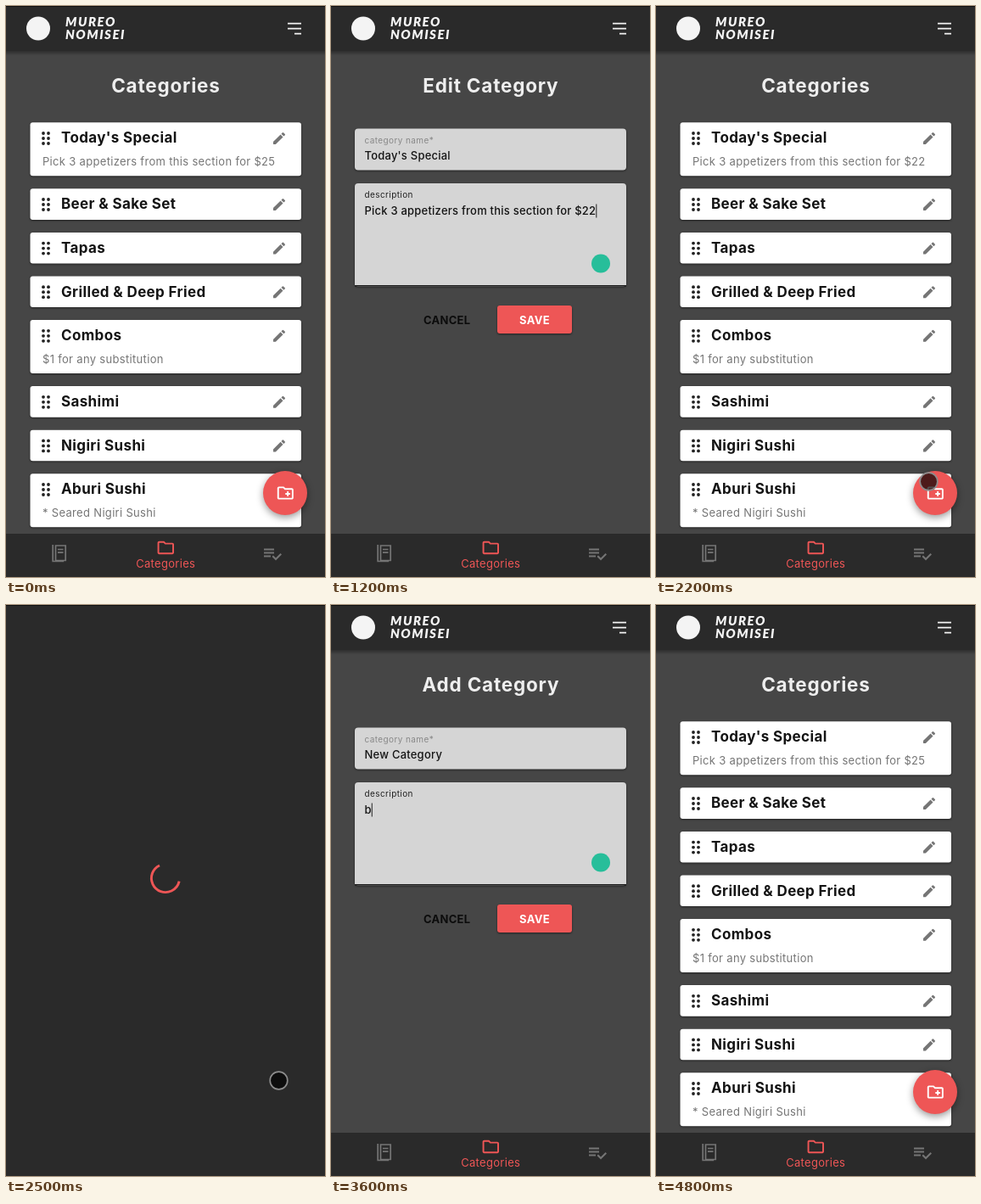
These frames come from a looping animation (376x673 px, 4900 ms). An HTML page:

```html
<!DOCTYPE html>
<html lang="en">
<head>
<meta charset="utf-8">
<title>Menu categories</title>
<style>
  html, body { margin: 0; width: 100%; height: 100%; overflow: hidden; background: #292929; }
  svg { display: block; width: 376px; height: 673px; }
  text { font-family: Inter, "Open Sans", sans-serif; white-space: pre; }
  .heading { font-size: 22.5px; font-weight: 700; letter-spacing: .8px; fill: #eee; text-anchor: middle; }
  .name { font-size: 17px; font-weight: 700; letter-spacing: .36px; fill: #141414; }
  .body { font-size: 13px; letter-spacing: .32px; }
  .input { font-weight: 500; letter-spacing: .22px; fill: #141414; }
  .small { font-size: 10px; letter-spacing: .4px; }
  .button { font-size: 13px; font-weight: 700; letter-spacing: .3px; text-anchor: middle; }
  .brand { font: italic 900 15px Lato, sans-serif; letter-spacing: 1.5px; fill: #f4f4f4; }
  .card { filter: drop-shadow(0 1px 1px #0008); }
  .fab { filter: drop-shadow(0 3px 4px #0006); }
</style>
</head>
<body>
<svg id="stage" viewBox="0 0 376 673"></svg>
<script>
const LOOP = 4900, STEP = 100;
const RED = '#ee5656', DARK = '#2a2a2a', GREY = '#757575';
const stage = document.getElementById('stage');

const icons = {
  pencil: 'M3 17.25V21h3.75L17.81 9.94l-3.75-3.75zM20.71 7.04a1 1 0 0 0 0-1.41l-2.34-2.34a1 1 0 0 0-1.41 0l-1.83 1.83 3.75 3.75z',
  folder: 'M20 6h-8l-2-2H4c-1.1 0-2 .9-2 2v12c0 1.1.9 2 2 2h16c1.1 0 2-.9 2-2V8c0-1.1-.9-2-2-2zm0 12H4V6h5.2l2 2H20z',
  plus: 'M12 14h2v2h2v-2h2v-2h-2v-2h-2v2h-2z',
  checklist: 'M14 10H2v2h12zm0-4H2v2h12zM2 16h8v-2H2zm19.5-4.5L23 13l-7 7-4.5-4.5L13 14l3 3z'
};

// start time, screen, spinner phase at that time
const scenes = [
  [0, 'list'], [300, 'loader', .12], [600, 'edit'],
  [1900, 'loader', .129], [2100, 'list'], [2300, 'loader', .109],
  [2600, 'add'], [4500, 'loader', .12], [4700, 'list']
];

// pointer paths: time, x, y
const pointerPaths = [
  [[100, 345, 250], [200, 322, 157], [500, 318, 160], [700, 200, 242]],
  [[1500, 260, 300], [1700, 238, 362], [1800, 232, 368], [1900, 144.5, 365.5],
   [2000, 180, 405], [2200, 321.5, 560.5], [2500, 321.5, 560.5], [2700, 150, 176]],
  [[4200, 150, 285], [4300, 171.5, 337.5], [4400, 222, 366], [4500, 225, 366], [4700, 390, 560]]
];

const categories = [
  ["Today's Special", 'Pick 3 appetizers from this section for $'],
  ['Beer &amp; Sake Set'], ['Tapas'], ['Grilled &amp; Deep Fried'],
  ['Combos', '$1 for any substitution'], ['Sashimi'], ['Nigiri Sushi'],
  ['Aburi Sushi', '* Seared Nigiri Sushi']
];

const text = (x, y, cls, str, attrs = '') => `<text x="${x}" y="${y}" class="${cls}" ${attrs}>${str}</text>`;
const rect = (x, y, w, h, fill, attrs = '') =>
  `<rect x="${x}" y="${y}" width="${w}" height="${h}" fill="${fill}" ${attrs}/>`;
const circle = (x, y, r, fill, attrs = '') => `<circle cx="${x}" cy="${y}" r="${r}" fill="${fill}" ${attrs}/>`;
const icon = (d, cx, cy, scale, fill) =>
  `<path d="${d}" fill="${fill}" transform="translate(${cx} ${cy}) scale(${scale}) translate(-12 -12)"/>`;
const typed = (str, t, start, perStep) => str.slice(0, Math.max(0, Math.floor((t - start) / STEP * perStep)));

// cubic-bezier(.42, 0, .58, 1)
function easeInOut(x) {
  let lo = 0, hi = 1, u = .5;
  for (let i = 0; i < 24; i++) {
    u = (lo + hi) / 2;
    const bx = 3 * (1 - u) ** 2 * u * .42 + 3 * (1 - u) * u * u * .58 + u ** 3;
    if (bx < x) lo = u; else hi = u;
  }
  return u * u * (3 - 2 * u);
}

function chrome(title) {
  return rect(0, 0, 376, 673, '#464646') +
    [0, 1, 2, 3, 4].map(i => rect(0, 53 + i, 376, 1, '#000', `opacity="${.3 - i * .06}"`)).join('') +
    rect(0, 0, 376, 53, DARK) +
    circle(38, 26.5, 14, '#f4f4f4') +
    text(70, 23.5, 'brand', 'MUREO') + text(70, 39, 'brand', 'NOMISEI') +
    '<path d="M332 20.7h16M332 26.7h16M340 32.7h8" stroke="#f4f4f4" stroke-width="1.8"/>' +
    text(188.4, 102, 'heading', title);
}

function navBar() {
  return rect(0, 622, 376, 51, DARK) +
    `<path d="M55.2 635v19.5h13M58.5 636h11.7v17.5h-11.7zM61 640.5h6.5M61 644.2h6.5" fill="none" stroke="${GREY}" stroke-width="1.7"/>` +
    icon(icons.folder, 188.3, 638.5, .97, RED) +
    icon(icons.checklist, 314, 645.5, 1, GREY) +
    text(188.2, 662.2, 'body', 'Categories', `fill="${RED}" text-anchor="middle"`);
}

function card(y, [name, note], price) {
  let dots = '';
  for (const x of [44, 50]) for (const dy of [12.7, 18.7, 24.7]) dots += circle(x, y + dy, 1.9, '#222');
  return rect(28.5, y, 319.5, note ? 63 : 36.6, '#fff', 'rx="3" class="card"') + dots +
    text(65, y + 24, 'name', name) + icon(icons.pencil, 322, y + 18.7, .78, GREY) +
    (note ? text(43, y + 50.7, 'body', note + price, `fill="${GREY}"`) : '');
}

function listScreen(t) {
  let y = 137.3, cards = '';
  categories.forEach((item, i) => {
    cards += card(y, item, i ? '' : t > 2000 && t < 2300 ? '22' : '25');
    y += item[1] ? 78 : 51.6;
  });
  return chrome('Categories') + cards +
    circle(329, 574, 26, RED, 'class="fab"') +
    icon(icons.folder + icons.plus, 329.3, 574, .95, '#fff') + navBar();
}

function field(y, h, label, value, focused, caret) {
  const raised = focused || value;
  return rect(28, y, 320, h, '#d5d5d5', 'rx="4" class="card"') +
    (focused ? rect(28, y + h - 4, 320, 2.5, '#d5d5d5') + rect(28, y + h - 1.5, 320, 1.5, '#1c1c1c') : '') +
    (raised
      ? text(39.5, y + 17, 'small', label, `fill="${focused ? '#222' : '#888'}"`)
      : text(39.5, y + 29, 'body', label, 'fill="#808080"')) +
    text(39.5, y + 36.5, 'body input', value, caret ? 'id="active"' : '');
}

function formScreen(title, name, note, focus, caret) {
  return chrome(title) +
    field(144.5, 49, 'category name*', name, focus === 'name', caret && focus === 'name') +
    field(209, 121.5, 'description', note, focus === 'note', caret && focus === 'note') +
    (focus === 'note' ? circle(318, 303.5, 11, '#27be9a') : '') +
    text(136.7, 375, 'button', 'CANCEL', 'fill="#0c0c0c"') +
    rect(196, 353, 88, 33, RED, 'rx="3" class="card"') +
    text(240, 375, 'button', 'SAVE', 'fill="#fff"') + navBar();
}

function editScreen(t) {
  const price = t < 1000 ? '25' : t < 1200 ? '2' : '22';
  return formScreen('Edit Category', categories[0][0], categories[0][1] + price, t < 800 ? '' : 'note', t < 1500);
}

function addScreen(t) {
  const focus = t < 2800 ? '' : t < 3500 ? 'name' : 'note';
  return formScreen('Add Category', typed('New Category', t, 2700, 2.34), typed('blah blah', t, 3500, 1.8),
    focus, t < 4200);
}

// Arc grows during the first half of a turn and is swallowed during the second.
function loaderScreen(phase) {
  const p = phase % 1, e = easeInOut(p * 2 % 1);
  const [dash, offset] = p < .5 ? [1 + 99 * e, 15 * e] : [100, 15 + 110 * e];
  return rect(0, 0, 376, 673, DARK) +
    circle(0, 0, 20.2, 'none', `stroke="${RED}" stroke-width="3.6" stroke-dasharray="${dash} 200" stroke-dashoffset="${-offset}"
      transform="translate(188 322) scale(.82) rotate(${360 * p})"`);
}

function pointer(t) {
  const path = pointerPaths.find(p => t >= p[0][0] && t <= p[p.length - 1][0]);
  if (!path) return '';
  const i = Math.max(1, path.findIndex(k => k[0] >= t));
  const [t0, x0, y0] = path[i - 1], [t1, x1, y1] = path[i];
  const u = (t - t0) / (t1 - t0);
  return circle(x0 + (x1 - x0) * u, y0 + (y1 - y0) * u, 10.3, '#000', 'fill-opacity=".68" stroke="#8c8c8c" stroke-width="1.7"');
}

function drawCaret() {
  const active = document.getElementById('active');
  if (!active) return;
  const x = 39.5 + active.getComputedTextLength(), y = +active.getAttribute('y');
  active.insertAdjacentHTML('afterend', rect(x, y - 12, 1, 16, '#222'));
}

function render(t) {
  const [start, screen, phase] = scenes.filter(s => s[0] <= t).pop();
  const view = screen === 'list' ? listScreen(t)
    : screen === 'edit' ? editScreen(t)
    : screen === 'add' ? addScreen(t)
    : loaderScreen(phase + (t - start) / 350);
  stage.innerHTML = view + rect(0, 0, 376, 1, '#111') + pointer(t);
  drawCaret();
}

const origin = performance.now();
let shown = -1;
function tick() {
  const t = Math.floor((performance.now() - origin) % LOOP / STEP) * STEP;
  if (t !== shown) render(shown = t);
  requestAnimationFrame(tick);
}
tick();
</script>
</body>
</html>
```
